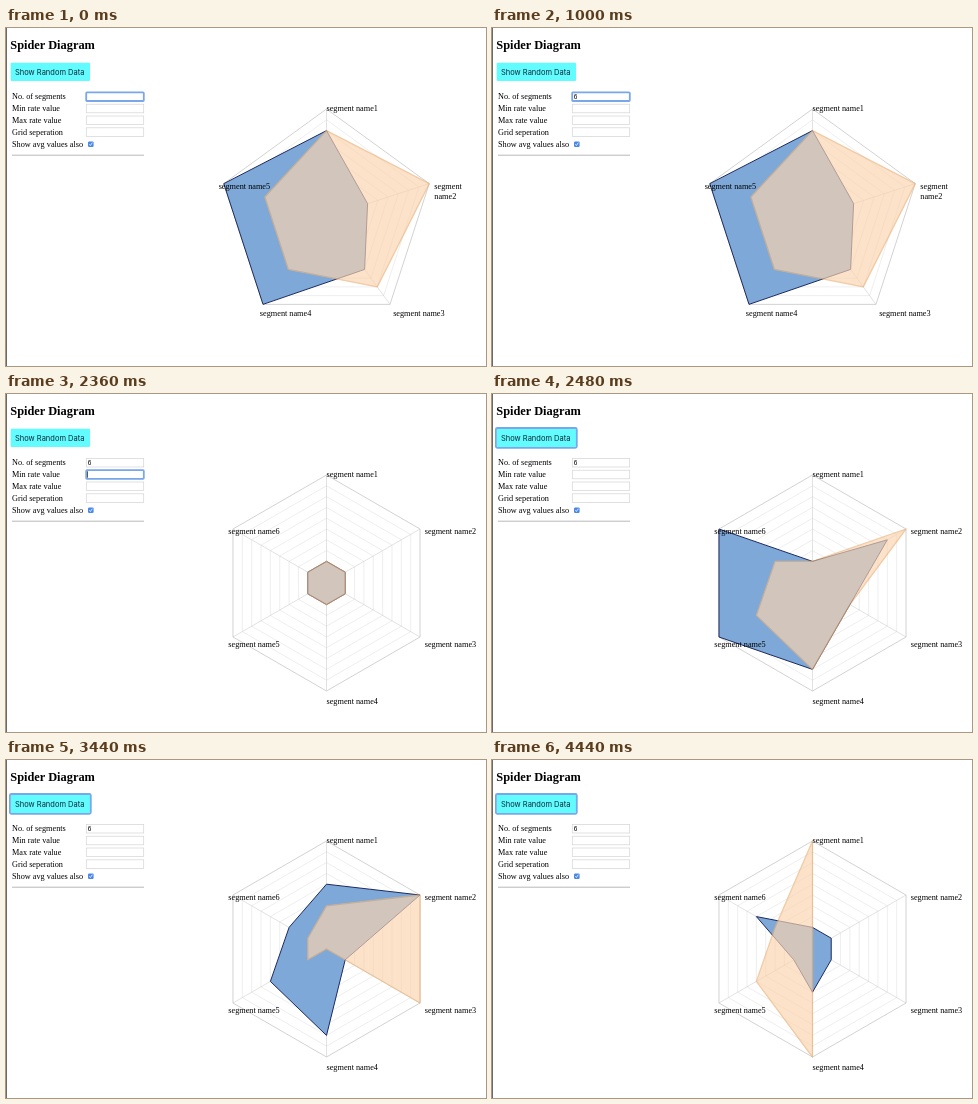
Recreate the animation shown at these times as an HTML page. Size 480 by 338 pixels, loop 5080 ms.

```html
<!DOCTYPE html>
<html lang="en">
<head>
<meta charset="utf-8">
<title>Spider Diagram</title>
<style>
  html, body { margin: 0; width: 100%; height: 100%; overflow: hidden; background: #fff; }
  svg { display: block; width: 480px; height: 338px; }
  text { font: 8.24px "Liberation Serif", "Times New Roman", serif; fill: #000; }
  .title { font-size: 12.36px; font-weight: bold; }
  .button { font: 7.5px Inter, sans-serif; fill: #0d2b3a; }
  .value { font: 6.4px "Liberation Sans", Arial, sans-serif; }
  .field { fill: #fff; stroke: #d4d4d4; stroke-width: .7; }
  .focus { fill: none; stroke: #79a7ea; stroke-width: 1.8; }
  .ring { fill: none; stroke: #e2e2e2; stroke-width: .6; }
  .outer { stroke: #b4b4b4; }
  .axis { stroke: #cfcfcf; stroke-width: .6; }
  .data { fill: #7ea8d8; stroke: #1d2a60; stroke-width: 1; stroke-linejoin: round; }
  .average { fill: #fbd4af; stroke: #e9b279; stroke-width: 1.3; stroke-linejoin: round; opacity: .67; }
</style>
</head>
<body>
<svg viewBox="0 0 480 338">
  <rect width="1" height="338" fill="#6a6a6a"/>
  <text class="title" x="4.3" y="21">Spider Diagram</text>
  <rect x="4.7" y="34.8" width="79.3" height="18.2" rx="1" fill="#62fbfe"/>
  <rect id="buttonFocus" class="focus" x="3.9" y="34" width="80.9" height="19.8" rx="1.5"/>
  <text class="button" x="9" y="46.8">Show Random Data</text>
  <g id="form"></g>
  <rect x="82" y="113.4" width="5.6" height="5.6" rx="1.2" fill="#4a88e6"/>
  <path d="M83.3 116.3l1.1 1.2 1.9-2.8" fill="none" stroke="#fff" stroke-width=".8"/>
  <path d="M6 127.2H138" stroke="#a8a8a8" stroke-width=".8"/>
  <rect id="fieldFocus" class="focus" x="80.2" width="57.6" height="8.6" rx=".8"/>
  <text id="typed" class="value" x="81.8" y="71.1">6</text>
  <rect id="caret" width=".8" height="6.4" fill="#333"/>
  <g id="chart"></g>
</svg>
<script>
const LOOP = 5080, CX = 320.5, CY = 189, R = 108, LEVELS = 10, ROW = 11.8;
const el = id => document.getElementById(id);
const show = (id, on) => el(id).setAttribute('visibility', on ? 'visible' : 'hidden');

// Each scene: start time, data values, average values (clockwise from the top)
const scenes = [
  [0, [8, 4, 6, 10, 10], [8, 10, 8, 6, 6]],
  [1120, [2, 2, 2, 2, 2, 2], [2, 2, 2, 2, 2, 2]],
  [2400, [2, 8, 4, 8, 10, 10], [2, 10, 4, 8, 6, 4]],
  [3440, [6, 10, 2, 8, 6, 4], [4, 10, 10, 0, 2, 2]],
  [4120, [2, 2, 2, 4, 2, 6], [10, 0, 0, 10, 6, 4]]
];

function point(i, count, value) {
  const angle = 2 * Math.PI * i / count, r = R * value / LEVELS;
  return [CX + r * Math.sin(angle), CY - r * Math.cos(angle)];
}

const polygon = (values, cls) =>
  `<polygon class="${cls}" points="${values.map((v, i) => point(i, values.length, v)).join(' ')}"/>`;

function label(i, count) {
  const [x, y] = point(i, count, 10.5);
  const words = ['segment', 'name' + (i + 1)];
  const lines = x > 425 ? words : [words.join(' ')];
  return lines.map((s, k) => `<text x="${x}" y="${y + 7.3 + 9.3 * k}">${s}</text>`).join('');
}

function chart(data, average) {
  const n = data.length;
  let out = '';
  for (let level = 1; level <= LEVELS; level++)
    out += polygon(Array(n).fill(level), level === LEVELS ? 'ring outer' : 'ring');
  for (let i = 0; i < n; i++) {
    const [x, y] = point(i, n, LEVELS);
    out += `<line class="axis" x1="${CX}" y1="${CY}" x2="${x}" y2="${y}"/>`;
  }
  out += polygon(data, 'data') + polygon(average, 'average');
  for (let i = 0; i < n; i++) out += label(i, n);
  return out;
}

el('form').innerHTML =
  ['No. of segments', 'Min rate value', 'Max rate value', 'Grid seperation', 'Show avg values also']
    .map((name, i) => `<text x="6" y="${71.3 + ROW * i}">${name}</text>` +
      (i < 4 ? `<rect class="field" x="80.3" y="${64.4 + ROW * i}" width="57.4" height="8.6"/>` : ''))
    .join('');

let current = -1;
function draw(now) {
  const t = now % LOOP;
  const scene = scenes.filter(s => s[0] <= t).length - 1;
  if (scene !== current) {
    current = scene;
    el('chart').innerHTML = chart(scenes[scene][1], scenes[scene][2]);
  }
  const row = t < 1120 ? 0 : 1;
  el('fieldFocus').setAttribute('y', 64.4 + ROW * row);
  el('caret').setAttribute('x', row ? 81.2 : 86);
  el('caret').setAttribute('y', 65.5 + ROW * row);
  show('fieldFocus', t < 2400);
  show('buttonFocus', t >= 2400);
  show('typed', t >= 600);
  show('caret', t >= 600 && t < 1000 || t >= 1120 && t < 1560 || t >= 2000 && t < 2400);
  requestAnimationFrame(draw);
}
draw(performance.now());
</script>
</body>
</html>
```
